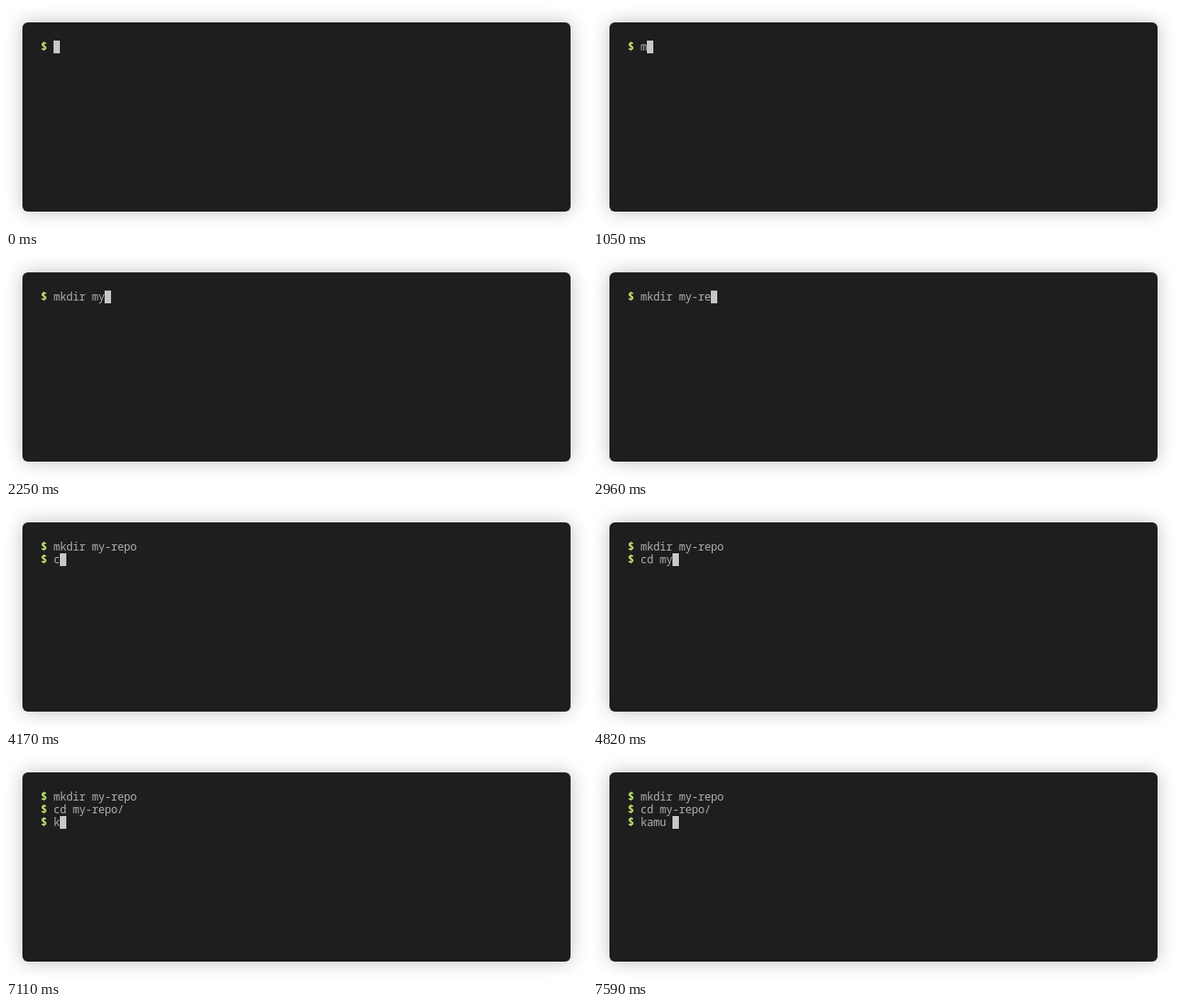
An HTML page that plays this animation: 636 by 244 pixels, repeating every 7990 ms.

```html
<!DOCTYPE html>
<html lang="en">
<head>
<meta charset="utf-8">
<title>Terminal session</title>
<style>
  html, body { margin: 0; width: 100%; height: 100%; overflow: hidden; background: #fff; }
  #term {
    position: absolute; left: 18px; top: 18px; width: 600px; height: 208px;
    border-radius: 6px; background: #1e1e1e;
    box-shadow: 0 0 20px rgba(0, 0, 0, .25);
  }
  svg { position: absolute; left: 0; top: 0; }
  text {
    font: 12px "Noto Sans Mono", "DejaVu Sans Mono", monospace;
    fill: #afafaf; white-space: pre;
  }
  .prompt { font-weight: 700; fill: #c8ed71; }
  #cursor { fill: #c7c7c7; }
</style>
</head>
<body>
<div id="term"></div>
<svg id="screen" width="636" height="244" viewBox="0 0 636 244">
  <rect id="cursor" width="7" height="14"/>
</svg>
<script>
const LOOP = 7990, CELL = 7, ROW = 14, LEFT = 38, TOP = 38;

// Each line: when its prompt appears, then the typed pieces with their times.
const lines = [
  { at: 0, keys: [
    [1050, 'm'], [1120, 'k'], [1290, 'd'], [1420, 'i'], [1550, 'r'], [1660, ' '],
    [1920, 'm'], [2250, 'y'], [2680, '-'], [2880, 'r'], [2960, 'e'], [3240, 'p'], [3310, 'o']] },
  { at: 3680, keys: [
    [4170, 'c'], [4230, 'd'], [4360, ' '], [4570, 'm'], [4820, 'y'], [5010, '-repo/']] },
  { at: 5600, keys: [
    [7110, 'k'], [7180, 'a'], [7310, 'm'], [7470, 'u'], [7590, ' ']] }
];

const screen = document.getElementById('screen');
const cursor = document.getElementById('cursor');

function addText(row, cls) {
  const el = document.createElementNS('http://www.w3.org/2000/svg', 'text');
  el.setAttribute('y', TOP + row * ROW + 11);
  el.setAttribute('class', cls);
  screen.appendChild(el);
  return el;
}

// Place every character on the terminal's whole-pixel grid.
function write(el, str, col) {
  if (el.textContent === str) return;
  el.setAttribute('x', [...str].map((_, i) => LEFT + (col + i) * CELL).join(' '));
  el.textContent = str;
}

lines.forEach((line, row) => {
  line.prompt = addText(row, 'prompt');
  line.command = addText(row, 'command');
});

function draw() {
  const t = performance.now() % LOOP;
  lines.forEach((line, row) => {
    const shown = t >= line.at;
    const typed = line.keys.filter(([at]) => t >= at).map(([, s]) => s).join('');
    write(line.prompt, shown ? '$' : '', 0);
    write(line.command, typed, 2);
    if (shown) {
      cursor.setAttribute('x', LEFT + (2 + typed.length) * CELL);
      cursor.setAttribute('y', TOP + row * ROW);
    }
  });
  requestAnimationFrame(draw);
}
draw();
</script>
</body>
</html>
```
